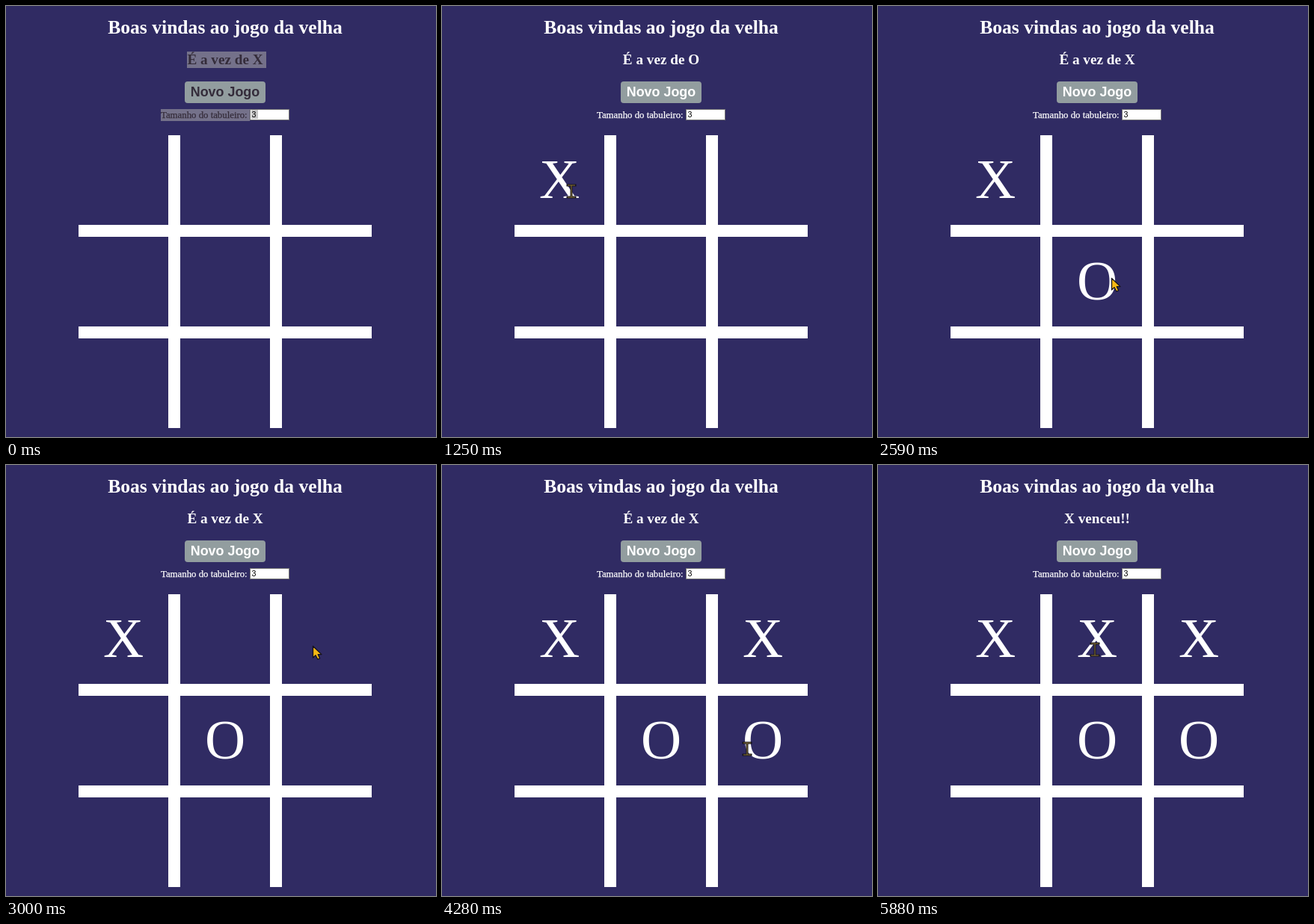
An HTML page that plays this animation: 575 px wide and 577 px high, repeating every 8000 ms.

```html
<!DOCTYPE html>
<html lang="pt-BR">
<head>
<meta charset="utf-8">
<title>Jogo da velha</title>
<style>
  html, body { margin: 0; width: 100%; height: 100%; overflow: hidden; background: #302b63; }
  svg { display: block; }
  text { font-family: "Liberation Serif", serif; fill: #fff; }
  .middle { text-anchor: middle; }
  .bold { font-weight: bold; }
  .sans { font-family: "Liberation Sans", sans-serif; }
  .label { stroke: currentColor; stroke-width: .25; color: #fff; }
  #highlight { fill: #74718a; }
  .selected .selectable { fill: #342c3a; color: #342c3a; }
</style>
</head>
<body>
<svg id="stage" width="575" height="577" viewBox="0 0 575 577">
  <text class="middle bold" x="293" y="37" font-size="25.6">Boas vindas ao jogo da velha</text>

  <rect x="239" y="101" width="108" height="29" rx="4" fill="#929d9f"/>
  <rect x="326.5" y="138.5" width="52" height="14" fill="#fff" stroke="#767676"/>
  <g id="highlight">
    <rect x="242" y="61" width="106" height="22"/>
    <rect x="207" y="138" width="119" height="16"/>
    <rect x="328" y="139" width="9" height="12" fill="#c8c8c8"/>
  </g>
  <text id="status" class="middle bold selectable" x="293" y="78" font-size="19.2"></text>
  <text class="middle bold sans selectable" x="293" y="121" font-size="17.92">Novo Jogo</text>
  <text class="label selectable" x="207" y="150" font-size="12.8">Tamanho do tabuleiro:</text>
  <text class="sans" x="328.5" y="149" font-size="10.67" style="fill:#000">3</text>

  <path d="M225 173V565M361 173V565M97 301H489M97 437H489" stroke="#fff" stroke-width="16"/>
  <g id="marks" class="middle" font-size="75"></g>

  <g id="cursor">
    <path id="arrow" d="M.5 .5V16L4 12.8L6.8 18L9.6 16.8L7.2 11.6H12Z"
      fill="#f5b814" stroke="#15121c" stroke-width="1.3" stroke-linejoin="round"/>
    <g id="beam" fill="none">
      <path d="M-5 -8H5M-5 8H5M0 -8V8" stroke="#15121c" stroke-width="3" stroke-linecap="square"/>
      <path d="M-5 -8H5M-5 8H5M0 -8V8" stroke="#8d7734"/>
    </g>
  </g>
</svg>
<script>
const LOOP = 8000;
const CELL = 136;
const BOARD = { x: 97, y: 173 };
const SELECTION_END = 1120;
const BEAM_DELAY = 70;
const $ = id => document.getElementById(id);

// Each turn: the pointer departs, curves past `via`, stops at `to`, then plays
const turns = [
  { depart: 345, travel: 635, via: [230, 380], to: [173, 248], play: 1180 },
  { depart: 1480, travel: 450, via: [271, 333], to: [298, 389], play: 2120 },
  { depart: 2560, travel: 450, via: [350, 290], to: [410, 242], play: 3200 },
  { depart: 3640, travel: 450, via: [407, 299], to: [408, 380], play: 4210 },
  { depart: 4760, travel: 700, via: [284, 372], to: [290, 247], play: 5810 }
];

const player = i => 'XO'[i % 2];

turns.forEach((turn, i) => {
  const col = Math.floor((turn.to[0] - BOARD.x) / CELL);
  const row = Math.floor((turn.to[1] - BOARD.y) / CELL);
  turn.from = i ? turns[i - 1].to : [480, 580];
  turn.node = document.createElementNS('http://www.w3.org/2000/svg', 'text');
  turn.node.setAttribute('x', BOARD.x + 60 + col * CELL);
  turn.node.setAttribute('y', BOARD.y + 84 + row * CELL);
  turn.node.textContent = player(i);
  $('marks').append(turn.node);
});

const easeOut = p => 1 - (1 - p) ** 2;

function pointerAt({ depart, travel, from, via, to }, t) {
  const k = easeOut(Math.min(1, Math.max(0, (t - depart) / travel)));
  return from.map((a, i) =>
    Math.round((1 - k) ** 2 * a + 2 * k * (1 - k) * via[i] + k * k * to[i]));
}

function show(node, visible) {
  node.style.display = visible ? '' : 'none';
}

function draw(t) {
  const played = turns.filter(turn => t >= turn.play).length;
  turns.forEach((turn, i) => show(turn.node, i < played));
  $('status').textContent = played < turns.length
    ? `É a vez de ${player(played)}`
    : `${player(played - 1)} venceu!!`;

  const selected = t < SELECTION_END;
  $('stage').classList.toggle('selected', selected);
  show($('highlight'), selected);

  // The pointer is a text beam while it rests on a fresh mark
  const turn = turns.findLast(({ depart }) => t >= depart) || turns[0];
  const beam = t >= turn.play + BEAM_DELAY;
  show($('arrow'), !beam);
  show($('beam'), beam);
  $('cursor').setAttribute('transform', `translate(${pointerAt(turn, t)})`);
}

const start = performance.now();
function frame() {
  draw((performance.now() - start) % LOOP);
  requestAnimationFrame(frame);
}
frame();
</script>
</body>
</html>
```
